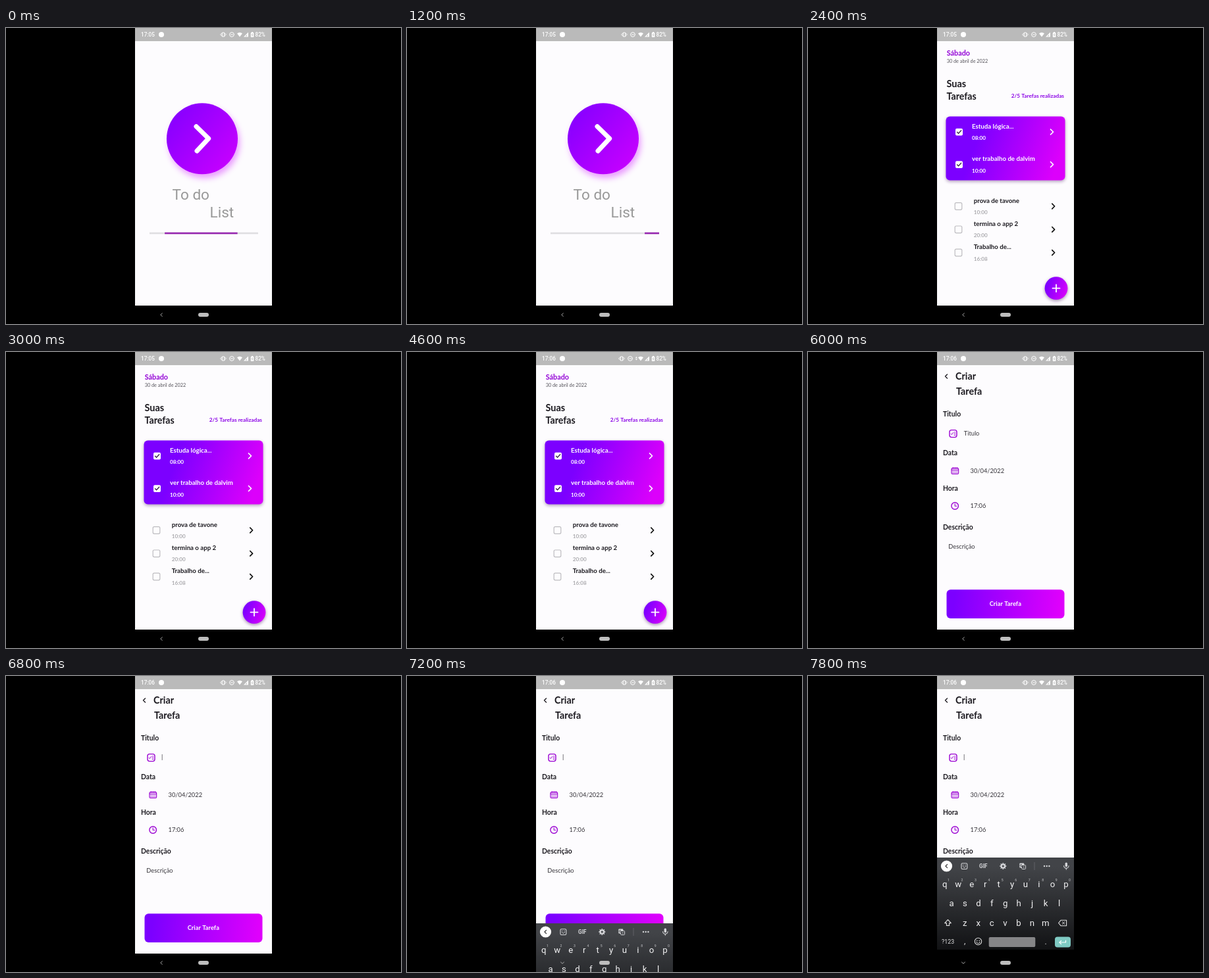
Write an HTML page with a canvas that moves like this. It is 600x450 px and loops after 8000 ms.

```html
<!DOCTYPE html>
<html lang="pt">
<head>
<meta charset="utf-8">
<title>To do List</title>
<style>
html, body { margin: 0; width: 100%; height: 100%; overflow: hidden; background: #000; }
canvas { display: block; width: 600px; height: 450px; }
</style>
</head>
<body>
<canvas id="stage" width="600" height="450"></canvas>
<script>
const ctx = document.getElementById('stage').getContext('2d');
const LOOP = 8000, STEP = 200;
const INK = '#1c1a20', PURPLE = '#9a00d2', WHITE = '#fff';

function text(str, x, y, size, { color = INK, weight = 400, font = 'Lato', align = 'left' } = {}) {
  ctx.font = `${weight} ${size}px ${font}, sans-serif`;
  ctx.textAlign = align;
  ctx.fillStyle = color;
  ctx.fillText(str, x, y);
}
const bold = (str, x, y, size, color = INK, align = 'left') =>
  text(str, x, y, size, { color, weight: 700, align });
const roboto = (str, x, y, size, color = WHITE, align = 'left', weight = 400) =>
  text(str, x, y, size, { color, weight, align, font: 'Roboto' });

function line(points, color, width) {
  ctx.beginPath();
  points.forEach(([x, y]) => ctx.lineTo(x, y));
  ctx.strokeStyle = color;
  ctx.lineWidth = width;
  ctx.lineCap = ctx.lineJoin = 'round';
  ctx.stroke();
}

function rect(x, y, w, h, color) {
  ctx.fillStyle = color;
  ctx.fillRect(x, y, w, h);
}

function shape(build, fill, stroke, width = 1) {
  ctx.beginPath();
  build();
  if (fill) { ctx.fillStyle = fill; ctx.fill(); }
  if (stroke) { ctx.strokeStyle = stroke; ctx.lineWidth = width; ctx.stroke(); }
}
const box = (x, y, w, h, r, fill, stroke, width) =>
  shape(() => ctx.roundRect(x, y, w, h, r), fill, stroke, width);
const circle = (x, y, r, fill, stroke, width) =>
  shape(() => ctx.arc(x, y, r, 0, Math.PI * 2), fill, stroke, width);
const polygon = (points, fill) =>
  shape(() => points.forEach(([x, y]) => ctx.lineTo(x, y)), fill);

function gradient(x0, y0, x1, y1, from, to) {
  const g = ctx.createLinearGradient(x0, y0, x1, y1);
  g.addColorStop(0, from);
  g.addColorStop(1, to);
  return g;
}

function withShadow(color, blur, dx, dy, draw) {
  ctx.save();
  Object.assign(ctx, { shadowColor: color, shadowBlur: blur, shadowOffsetX: dx, shadowOffsetY: dy });
  draw();
  ctx.restore();
}

// dir 1 points right, -1 left
const chevron = (x, y, size, dir, color, width) =>
  line([[x - dir * size / 2, y - size], [x + dir * size / 2, y], [x - dir * size / 2, y + size]], color, width);

function statusBar(t) {
  const syncing = t >= 3600 && t < 5600;
  const shift = syncing ? -4 : 0;
  rect(196, 0, 208, 20, '#bababa');
  roboto(t < 3600 ? '17:05' : '17:06', 205, 13, 8.2, WHITE, 'left', 500);
  circle(236, 10, 4, WHITE);
  box(328.2 + shift, 7, 3.6, 6, 1, null, WHITE, 1.2);
  for (const dir of [1, -1]) chevron(330 + shift + dir * 3.6, 10, 1.8, dir, WHITE, 0.9);
  circle(343 + shift, 10, 3.4, null, WHITE, 1);
  line([[341.5 + shift, 10], [344.5 + shift, 10]], WHITE, 1);
  if (syncing) {
    polygon([[346.8, 9.2], [348.4, 7], [350, 9.2]], WHITE);
    polygon([[346.8, 10.4], [348.4, 12.6], [350, 10.4]], WHITE);
  }
  shape(() => { ctx.moveTo(355, 13.5); ctx.lineTo(351, 8.2); ctx.quadraticCurveTo(355, 5.2, 359, 8.2); }, WHITE);
  polygon([[361, 13.5], [368, 13.5], [368, 6.5]], WHITE);
  polygon([[363.5, 12.5], [366, 12.5], [366, 10]], '#c6c6c6');
  box(371.8, 7, 4.6, 7, 0.8, WHITE);
  rect(373, 6, 2.2, 1, WHITE);
  line([[374.4, 8.4], [373.3, 10.6], [374.9, 10.4], [373.8, 12.6]], '#aaa', 0.6);
  roboto('82%', 378.5, 13, 8.2, WHITE, 'left', 500);
}

function navBar(keyboardOpen) {
  if (keyboardOpen) line([[233.5, 435], [236, 437.3], [238.5, 435]], '#aaa', 1);
  else chevron(236, 436, 2.5, -1, '#aaa', 1);
  box(292, 433, 16, 6, 3, '#bdbdbd');
}

// start and end of the loader segment for every step, as shares of the track
const LOADER = [[.14, .81], [.71, 1], [0, 0], [0, .37], [.17, .73], [.37, 1], [.867, 1]];

function splash(t) {
  withShadow('rgba(214,60,255,.5)', 10, 3, 6, () =>
    circle(298, 168.3, 54, gradient(255, 135, 340, 205, '#8a00ff', '#c400ff')));
  line([[289, 149.8], [307.7, 168], [290, 187]], WHITE, 7);
  roboto('To do', 252.5, 261, 22.6, '#999');
  roboto('List', 309.5, 288, 22.6, '#999');
  const [from, to] = LOADER[Math.min(t / STEP, LOADER.length - 1)];
  rect(218, 310.7, 165, 2.6, '#dfdee1');
  rect(218 + from * 165, 310.7, (to - from) * 165, 2.6, '#9727b0');
}

function doneTask(title, time, y) {
  box(224, y - 5.3, 11, 10.8, 2, WHITE);
  line([[226.5, y + .2], [228.6, y + 2.3], [232.7, y - 2.2]], '#3a2050', 1.3);
  bold(title, 249, y - 5.5, 9.7, WHITE);
  bold(time, 249, y + 12, 8.2, WHITE);
  chevron(370.5, y, 4, 1, WHITE, 1.7);
}

function openTask(title, time, y) {
  box(223.2, y - 5.3, 10.6, 10.6, 2, null, '#bdbcc0', 1.2);
  bold(title, 251.7, y - 5.5, 9.7);
  bold(time, 251.7, y + 12, 8.2, '#adacb0');
  chevron(372.7, y, 3.8, 1, '#111', 1.7);
}

function taskList() {
  bold('Sábado', 210.7, 42.3, 10.8, '#9200d6');
  text('30 de abril de 2022', 210.7, 53, 7.3, { color: '#55535a' });
  bold('Suas', 210.5, 90, 14.5);
  bold('Tarefas', 210.5, 108.5, 14.2);
  bold('2/5 Tarefas realizadas', 389, 106, 8.3, '#8a00e6', 'right');
  withShadow('rgba(60,0,90,.4)', 5, 0, 2, () =>
    box(209.5, 134.5, 181, 97, 6, gradient(265, 145, 386, 188, '#7c00ff', '#dc00fb')));
  doneTask('Estuda lógica...', '08:00', 158);
  doneTask('ver trabalho de dalvim', '10:00', 207.5);
  openTask('prova de tavone', '10:00', 271);
  openTask('termina o app 2', '20:00', 306.3);
  openTask('Trabalho de...', '16:08', 341.5);
  withShadow('rgba(60,0,90,.45)', 5, 0, 2, () =>
    circle(377, 395.7, 17.4, gradient(362, 390, 394, 402, '#7c00ff', '#d800fb')));
  line([[371.5, 395.7], [382.5, 395.7]], WHITE, 1.8);
  line([[377, 390.2], [377, 401.2]], WHITE, 1.8);
}

function formIcons() {
  box(215, 118.6, 11, 11, 3, null, PURPLE, 1.4);
  line([[217, 124.3], [218.3, 125.6], [220.4, 122.6]], PURPLE, 1);
  for (const y of [122, 124.3, 126.6]) line([[221.8, y], [224, y]], PURPLE, .9);

  box(218, 176.6, 10.6, 8.8, 1.5, null, PURPLE, 1.2);
  line([[218, 179.2], [228.6, 179.2]], PURPLE, 1);
  for (const x of [220.4, 223.3, 226.2]) {
    line([[x, 175.4], [x, 177.2]], PURPLE, 1.1);
    for (const y of [180.7, 182.9]) rect(x - .7, y - .3, 1.4, 1.3, PURPLE);
  }

  circle(223.2, 234, 5.3, null, PURPLE, 1.4);
  line([[223.2, 230.8], [223.2, 234.3], [226, 234.3]], PURPLE, 1.1);
}

function form(focused) {
  chevron(210, 37, 3, -1, INK, 1.4);
  bold('Criar', 224, 41.5, 14.3);
  bold('Tarefa', 225, 64.7, 14.3);
  [['Titulo', 97.6], ['Data', 157], ['Hora', 210.8], ['Descrição', 270]]
    .forEach(([label, y]) => bold(label, 205, y, 10.4));
  formIcons();
  const value = (str, x, y) => text(str, x, y, 9.3, { color: '#37353b' });
  if (focused) rect(236.7, 119, 1, 9, '#77757b');
  else value('Titulo', 236.7, 126.6);
  value('30/04/2022', 246.5, 183.8);
  value('17:06', 246.5, 237.3);
  value('Descrição', 213.3, 299);
  box(210.5, 361.2, 179, 43.8, 6, gradient(222, 376, 384, 392, '#7c00ff', '#df00fc'));
  bold('Criar Tarefa', 299.8, 386.2, 9.4, WHITE, 'center');
}

function keyboardTools() {
  const pale = '#d5d6d9';
  circle(210.5, 289, 8.6, WHITE);
  chevron(210.3, 289, 2.6, -1, '#333', 1.2);

  box(233, 284.7, 8.8, 8.8, 1.6, null, pale, 1.1);
  line([[235.3, 289.5], [237.4, 291.3], [239.6, 289.5]], pale, 1);
  for (const x of [235.7, 239]) circle(x, 287.5, .7, pale);
  roboto('GIF', 266.3, 292, 8.2, pale, 'center', 700);

  for (let i = 0; i < 8; i++) {
    const a = i * Math.PI / 4;
    line([[296.3 + 3 * Math.cos(a), 289 + 3 * Math.sin(a)], [296.3 + 4.2 * Math.cos(a), 289 + 4.2 * Math.sin(a)]], pale, 1.8);
  }
  circle(296.3, 289, 2.6, null, pale, 2);

  box(321.3, 284.6, 7, 7, 1, pale);
  box(324.6, 287.5, 6, 6, 1, '#3f4145', pale, 1);
  roboto('G', 323.8, 290, 5, '#3f4145', 'center', 700);
  roboto('x', 327.7, 292.3, 5, pale, 'center');
  rect(343.5, 283, 1, 12, '#606166');
  for (const x of [359, 362.7, 366.4]) circle(x, 289, 1.2, pale);

  box(390.6, 283.6, 3.4, 6.6, 1.7, pale);
  shape(() => ctx.arc(392.3, 288.5, 3.7, 0, Math.PI), null, pale, 1.1);
  line([[392.3, 292.3], [392.3, 294.3]], pale, 1.1);
}

function keyboard(offset) {
  ctx.save();
  ctx.beginPath();
  ctx.rect(196, 276, 208, 174);
  ctx.clip();
  ctx.translate(0, offset);
  rect(196, 276, 208, 174, '#000');
  rect(196, 276, 208, 140, gradient(0, 290, 0, 416, '#424448', '#111214'));
  keyboardTools();

  const row = (keys, x, y) => [...keys].forEach((key, i) => roboto(key, x + i * 20.45, y, 13.2, '#f2f2f3', 'center'));
  row('qwertyuiop', 207.8, 321);
  row('asdfghjkl', 218, 350);
  row('zxcvbnm', 238.2, 379.5);
  [...'1234567890'].forEach((n, i) => roboto(n, 213.5 + i * 20.45, 311.5, 5.2, '#c4c5c8', 'center'));

  polygonOutline([[212.5, 370.5], [217.3, 375.6], [214.6, 375.6], [214.6, 379.4], [210.4, 379.4], [210.4, 375.6], [207.7, 375.6]]);
  polygonOutline([[380.6, 375.5], [384, 371.3], [392.6, 371.3], [392.6, 379.7], [384, 379.7]]);
  line([[386.3, 373.8], [389.8, 377.2]], '#ddd', 1);
  line([[389.8, 373.8], [386.3, 377.2]], '#ddd', 1);

  roboto('?123', 212.6, 407, 8.8, '#e4e4e5', 'center');
  roboto(',', 238.3, 407, 12, '#e4e4e5', 'center');
  circle(258.5, 403.5, 5.2, null, '#ddd', 1.1);
  for (const x of [256.7, 260.3]) circle(x, 402.2, .8, '#ddd');
  shape(() => ctx.arc(258.5, 404, 2.6, .1, Math.PI - .1), null, '#ddd', 1);
  box(274.7, 397, 70.6, 15, 2, '#858587');
  roboto('.', 361, 407.5, 12, '#e4e4e5', 'center');
  box(375, 396.5, 24, 16, 4, '#7fcac3');
  line([[391.5, 402], [391.5, 405], [382, 405]], WHITE, 1.2);
  line([[384.6, 402.4], [382, 405], [384.6, 407.6]], WHITE, 1.2);
  ctx.restore();
}

function polygonOutline(points) {
  line([...points, points[0]], '#ddd', 1.1);
}

function draw(t) {
  rect(0, 0, 600, 450, '#000');
  rect(196, 20, 208, 402, '#fdfcfe');
  if (t < 2000) splash(t);
  else if (t < 5000) taskList();
  else form(t >= 6800);

  const opening = (t - 7200) / 400;
  if (opening >= 0) keyboard(100 * Math.max(0, 1 - opening) ** 2);
  statusBar(t);
  navBar(opening >= 0);
}

function frame() {
  const t = performance.now() % LOOP;
  draw(Math.floor(t / STEP) * STEP);
  requestAnimationFrame(frame);
}
frame();
</script>
</body>
</html>
```
